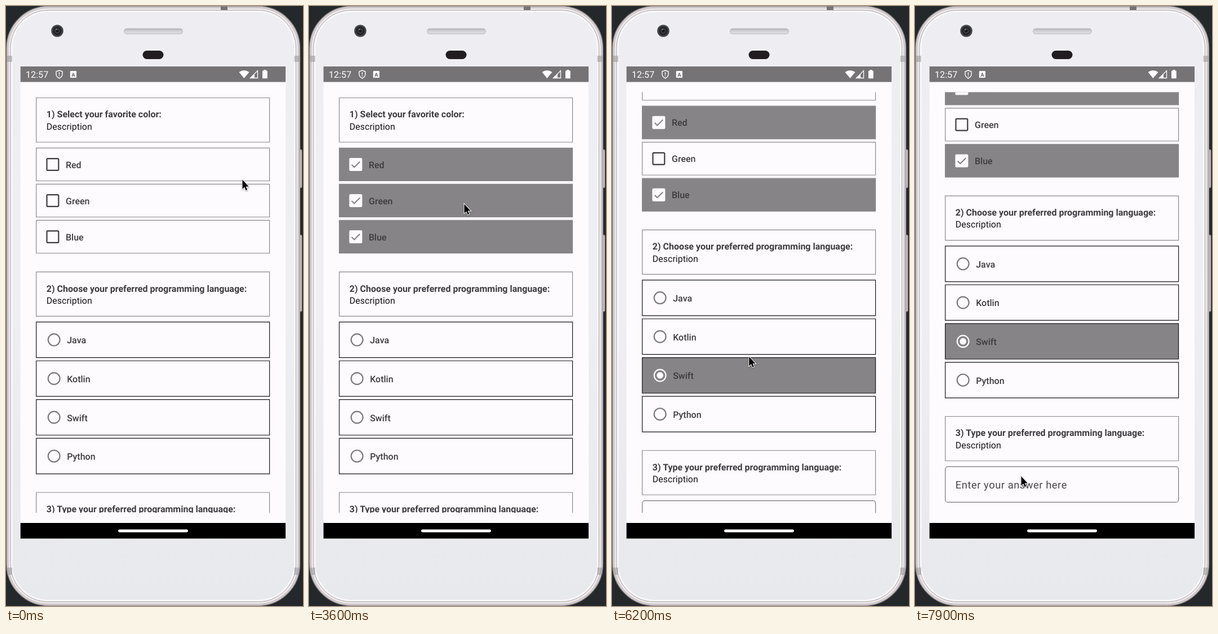
Recreate the animation shown at these times as an HTML page with a canvas. Size 527 by 1062 pixels, loop 8 s.

```html
<!DOCTYPE html>
<html lang="en">
<head>
<meta charset="utf-8">
<title>Survey form</title>
<style>
  html, body { margin: 0; width: 100%; height: 100%; overflow: hidden; background: #24282b; }
  canvas { display: block; width: 527px; height: 1062px; }
</style>
</head>
<body>
<canvas id="stage" width="527" height="1062"></canvas>
<script>
const ctx = document.getElementById('stage').getContext('2d');
ctx.textRendering = 'geometricPrecision';
const LOOP = 8000, STEP = 100;
const PAPER = '#fdfbfe', GREY = '#868487', INK = '#3e3b40', LINE = '#8a888b', BLACK = '#161517';
const VIEW = { top: 152.5, bottom: 897 };

// Rows: time, then values; values are linear between rows.
const pointer = [
  [0, 419, 306], [100, 368, 298], [200, 368, 298], [400, 306, 291], [500, 306, 291],
  [700, 300, 286], [900, 300, 286], [1700, 298, 357], [2000, 298, 357],
  [2800, 286, 409], [2900, 286, 409], [3500, 275, 349], [3700, 275, 349],
  [4500, 236, 614], [4600, 236, 609], [4800, 237, 602], [5000, 237, 602],
  [5100, 230, 629], [5500, 232, 722], [5900, 232, 724], [6100, 240, 700],
  [6500, 251, 377], [6700, 251, 377], [7100, 237, 632], [7700, 192, 824], [7900, 188, 831]
];
const scrolling = [[6000, 0], [6100, 14], [6300, 134.5]];
const stretching = [[6300, 0], [6500, 7.8], [7100, 7.8], [7400, 0]];

const checks = [
  { label: 'Red', top: 251.4, spans: [[900, LOOP]] },
  { label: 'Green', top: 315.4, spans: [[2000, 3700]] },
  { label: 'Blue', top: 379.4, spans: [[2900, LOOP]] }
];
const radios = [
  { label: 'Java', top: 559.4, spans: [[5100, 5700]] },
  { label: 'Kotlin', top: 628, spans: [] },
  { label: 'Swift', top: 696.6, spans: [[5700, LOOP]] },
  { label: 'Python', top: 765.2, spans: [] }
];
const questions = [
  ['1) Select your favorite color:', 162.5],
  ['2) Choose your preferred programming language:', 470.7],
  ['3) Type your preferred programming language:', 861]
];

function track(table, t) {
  const next = table.findIndex(row => row[0] > t);
  if (next === 0) return table[0].slice(1);
  if (next < 0) return table[table.length - 1].slice(1);
  const a = table[next - 1], b = table[next];
  const p = (t - a[0]) / (b[0] - a[0]);
  return a.slice(1).map((v, i) => v + (b[i + 1] - v) * p);
}

function rounded(x, y, w, h, r, fill, stroke, width = 1) {
  ctx.beginPath();
  ctx.roundRect(x, y, w, h, r);
  if (fill) { ctx.fillStyle = fill; ctx.fill(); }
  if (stroke) { ctx.strokeStyle = stroke; ctx.lineWidth = width; ctx.stroke(); }
}

function disc(x, y, r, fill, stroke, width) {
  rounded(x - r, y - r, 2 * r, 2 * r, r, fill, stroke, width);
}

function shape(path, x, y, fill, stroke, width = 1) {
  const p = new Path2D(path);
  ctx.save();
  ctx.translate(x, y);
  if (stroke) { ctx.strokeStyle = stroke; ctx.lineWidth = width; ctx.stroke(p); }
  if (fill) { ctx.fillStyle = fill; ctx.fill(p); }
  ctx.restore();
}

function text(str, x, y, weight, color, size = 16, spacing = 0) {
  ctx.font = `${weight} ${size}px Roboto, sans-serif`;
  ctx.letterSpacing = spacing + 'px';
  ctx.fillStyle = color;
  ctx.fillText(str, x, y);
}

function fade(x0, y0, x1, y1, ...colors) {
  const g = ctx.createLinearGradient(x0, y0, x1, y1);
  colors.forEach((c, i) => g.addColorStop(i / (colors.length - 1), c));
  return g;
}

function drawPhone() {
  ctx.fillStyle = '#24282b';
  ctx.fillRect(0, 0, 527, 1062);
  for (const [y, h] of [[254, 68], [405, 136]])
    rounded(518, y, 7, h, 2, '#d5cfd0', '#817b7d');

  // Each shell layer is centred on the screen and inset from the one before.
  const shell = (inset, fill, line, width) =>
    rounded(1 + inset, 0.5 + inset, 520.5 - 2 * inset, 1061 - 2 * inset, 74 - inset, fill, line, width);
  shell(0, '#d9d3d5', '#8f898b', 1.5);
  shell(3, '#eeeaec', '#bdb6b8');
  shell(7, '#f6f4f6', '#aaa3a6');
  shell(9.5, fade(0, 9, 0, 1053, '#eeeef2', '#efeef2', '#e8e9ed'), '#fbfafc', 2);

  ctx.fillStyle = '#99949688';
  for (const [y, h] of [[88, 11], [994, 13]]) {
    ctx.fillRect(2, y, 9, h);
    ctx.fillRect(511.5, y, 9, h);
  }
  ctx.fillStyle = '#777275';
  ctx.fillRect(381, 1, 12, 6);

  disc(91, 44, 10.8, '#48484b');
  disc(91, 44, 8, '#232427');
  disc(91, 44, 4.8, '#3b3d43');
  disc(91, 44, 2.6, '#17181b');
  disc(89.5, 41.5, 1.3, '#777b83');
  rounded(209.5, 40, 104, 9.5, 4.5, fade(0, 40, 0, 49.5, '#b5b3b7', '#d5d4d8', '#dddce0'), '#bdbbc0');
  rounded(242.5, 79, 37, 15, 7.5, '#201e21');

  const band = (y, h, color) => {
    ctx.fillStyle = color;
    ctx.fillRect(25.7, y, 470.4, h);
  };
  band(107, 835.6, PAPER);
  band(107, 27.5, '#767376');
  band(915, 27.6, '#000');
  rounded(199, 926.6, 124, 4.8, 2.4, '#fff');
}

function drawStatus() {
  text('12:57', 35, 127, 400, '#fff', 16.2);
  shape('M0 -7 L5.5 -5 V-.5 Q5.5 4.5 0 7 Q-5.5 4.5 -5.5 -.5 V-5 Z', 94.5, 121, null, '#fff', 1.4);
  ctx.fillStyle = '#fff';
  ctx.fillRect(93.8, 117.2, 1.4, 4.6);
  ctx.fillRect(93.8, 123, 1.4, 1.5);
  rounded(113.8, 115, 11.2, 12, 1, '#fff');
  text('A', 116.3, 124.5, 700, '#6a676a', 9.5);
  shape('M0 14 L-9 3 Q0 -3 9 3 Z', 422.5, 114, '#fff');
  shape('M0 13 L13 0 V13 Z', 433.5, 114.5, null, '#fff', 1.3);
  shape('M0 13 L7.5 5.5 V13 Z', 433.5, 114.5, '#fff');
  rounded(455, 114.5, 8.8, 13.7, 1, '#fff');
  ctx.fillStyle = '#fff';
  ctx.fillRect(457.4, 113, 4, 2);
}

function drawForm(t) {
  const [scroll] = track(scrolling, t), [pull] = track(stretching, t);
  // Overscroll pulls the content up, most strongly near the top.
  const at = y => {
    const v = y - scroll, p = (v - VIEW.top) / (VIEW.bottom - VIEW.top);
    return v - pull * (1 - p * p);
  };
  const box = (top, height, fill, stroke, radius = 0) => {
    const y = at(top);
    rounded(53.7, y, 413.9, at(top + height) - y, radius, fill, stroke, 1.2);
  };
  // Milliseconds since the option was picked, or -1 when it is off.
  const age = item => {
    const span = item.spans.find(([from, to]) => t >= from && t < to);
    return span ? t - span[0] : -1;
  };

  ctx.save();
  ctx.beginPath();
  ctx.rect(26, VIEW.top, 470, VIEW.bottom - VIEW.top);
  ctx.clip();

  for (const [title, top] of questions) {
    box(top, 78.5, PAPER, LINE);
    text(title, 71.8, at(top + 34.8), 700, INK);
    text('Description', 71.8, at(top + 56.2), 400, BLACK);
  }

  for (const item of checks) {
    const on = age(item) >= 0, y = at(item.top + 29.05);
    box(item.top, 58.1, on ? GREY : PAPER, on ? GREY : LINE);
    if (on) {
      rounded(71.4, y - 11.5, 23, 23, 2.2, PAPER);
      shape('M-7.2 .5 L-2.6 5 L7.4 -4.9', 82.9, y, null, GREY, 2.1);
    } else {
      rounded(72.5, y - 10.4, 20.8, 20.8, 1.5, null, INK, 2.2);
    }
    text(item.label, 106, at(item.top + 35.3), 500, INK);
  }

  for (const item of radios) {
    const since = age(item), on = since >= 0, y = at(item.top + 31.45);
    const starting = on && since < STEP;
    const ring = !on ? '#7c797d' : starting ? '#b8b6b9' : PAPER;
    box(item.top, 62.9, on ? GREY : PAPER, BLACK);
    disc(85.2, y, 10.4, null, ring, 2.2);
    if (on) disc(85.2, y, starting ? 1.7 : 5.8, starting ? '#d0ced1' : PAPER);
    text(item.label, 108.2, at(item.top + 37.9), 500, INK);
  }

  box(949.8, 63.1, PAPER, '#79767a', 4.5);
  text('Enter your answer here', 71.8, at(988.6), 400, '#4a474c', 18.28, 0.57);
  ctx.restore();
}

function drawPointer(t) {
  const [x, y] = track(pointer, t);
  const arrow = 'M.5 1.5 v16.2 l3.7 -3.3 l2.5 5.9 l2.5 -1.1 l-2.5 -5.8 h5 Z';
  ctx.save();
  ctx.shadowColor = '#0006';
  ctx.shadowBlur = 2.5;
  ctx.shadowOffsetY = 1;
  shape(arrow, x, y, null, '#fff', 2);
  ctx.restore();
  shape(arrow, x, y, '#000');
}

function draw(t) {
  drawPhone();
  drawStatus();
  drawForm(t);
  drawPointer(t);
}

const start = performance.now();
function tick() {
  const t = (performance.now() - start) % LOOP;
  draw(Math.floor(t / STEP) * STEP);
  requestAnimationFrame(tick);
}
tick();
</script>
</body>
</html>
```
